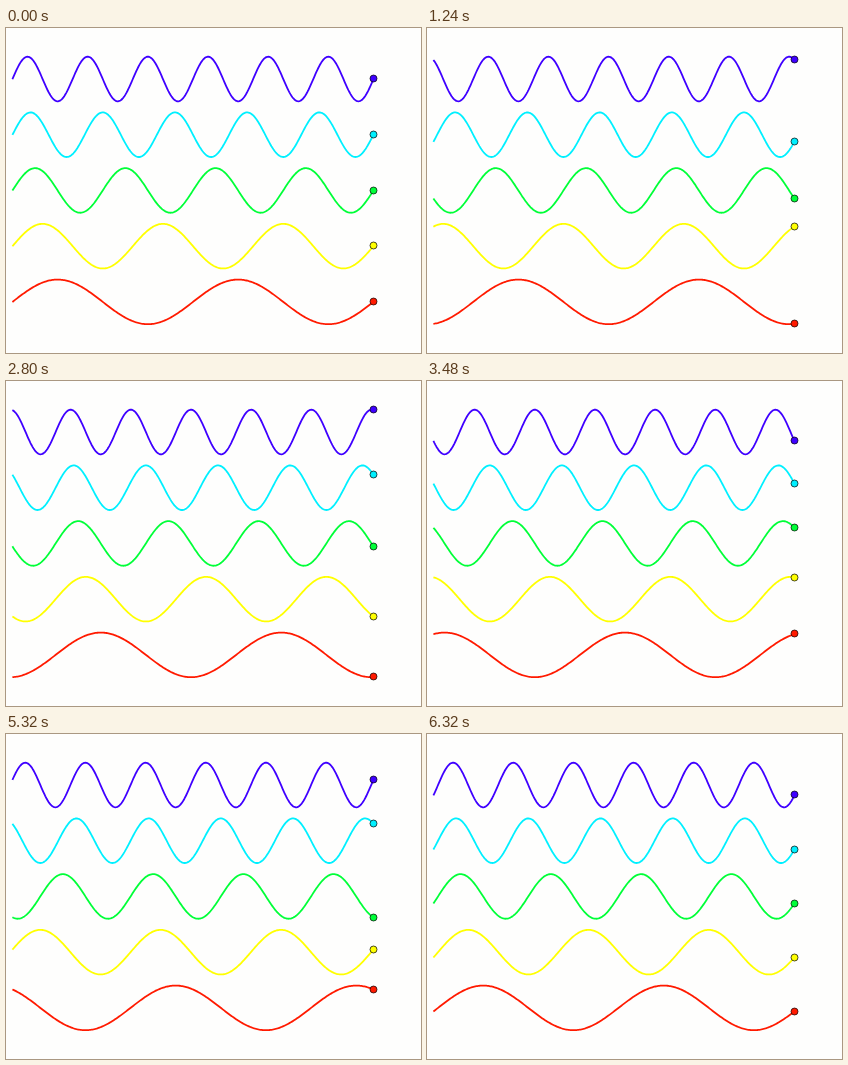
Recreate the animation shown at these times as an HTML page with a canvas. Size 415x325 px, loop 6360 ms.

```html
<!DOCTYPE html>
<html lang="en">
<head>
<meta charset="utf-8">
<title>Travelling sine waves</title>
<style>
  html, body { margin: 0; width: 100%; height: 100%; overflow: hidden; background: #fefefd; }
  canvas { display: block; }
</style>
</head>
<body>
<canvas width="415" height="325"></canvas>
<script>
const ctx = document.querySelector('canvas').getContext('2d');
const LEFT = 6.4, RIGHT = 367.5, SPAN = 361, AMP = 22.3;
const FRAME_MS = 40, FRAMES = 159, TURNS = 2;

const waves = ['#3f00ff', '#00f0ff', '#00ff38', '#ffff00', '#ff1a00']
  .map((color, i) => ({ color, cycles: 6 - i, mid: 51 + 55.72 * i }));

// The waves slide left by two full spans per loop.
function height(wave, x, progress) {
  const turn = (x - RIGHT) / SPAN + TURNS * progress;
  return wave.mid - AMP * Math.sin(2 * Math.PI * wave.cycles * turn);
}

function drawWave(wave, progress) {
  ctx.beginPath();
  for (let x = LEFT; x < RIGHT; x++) ctx.lineTo(x, height(wave, x, progress));
  const end = height(wave, RIGHT, progress);
  ctx.lineTo(RIGHT, end);
  ctx.strokeStyle = wave.color;
  ctx.lineWidth = 1.8;
  ctx.stroke();

  // The end marker snaps to whole pixels.
  ctx.beginPath();
  ctx.arc(RIGHT, Math.floor(end - 0.25) + 0.5, 3.5, 0, 2 * Math.PI);
  ctx.fillStyle = wave.color;
  ctx.fill();
  ctx.strokeStyle = '#000';
  ctx.lineWidth = 0.7;
  ctx.stroke();
}

function draw() {
  const frame = Math.floor(performance.now() / FRAME_MS) % FRAMES;
  ctx.clearRect(0, 0, 415, 325);
  for (const wave of waves) drawWave(wave, frame / FRAMES);
  requestAnimationFrame(draw);
}
ctx.lineJoin = 'round';
draw();
</script>
</body>
</html>
```
